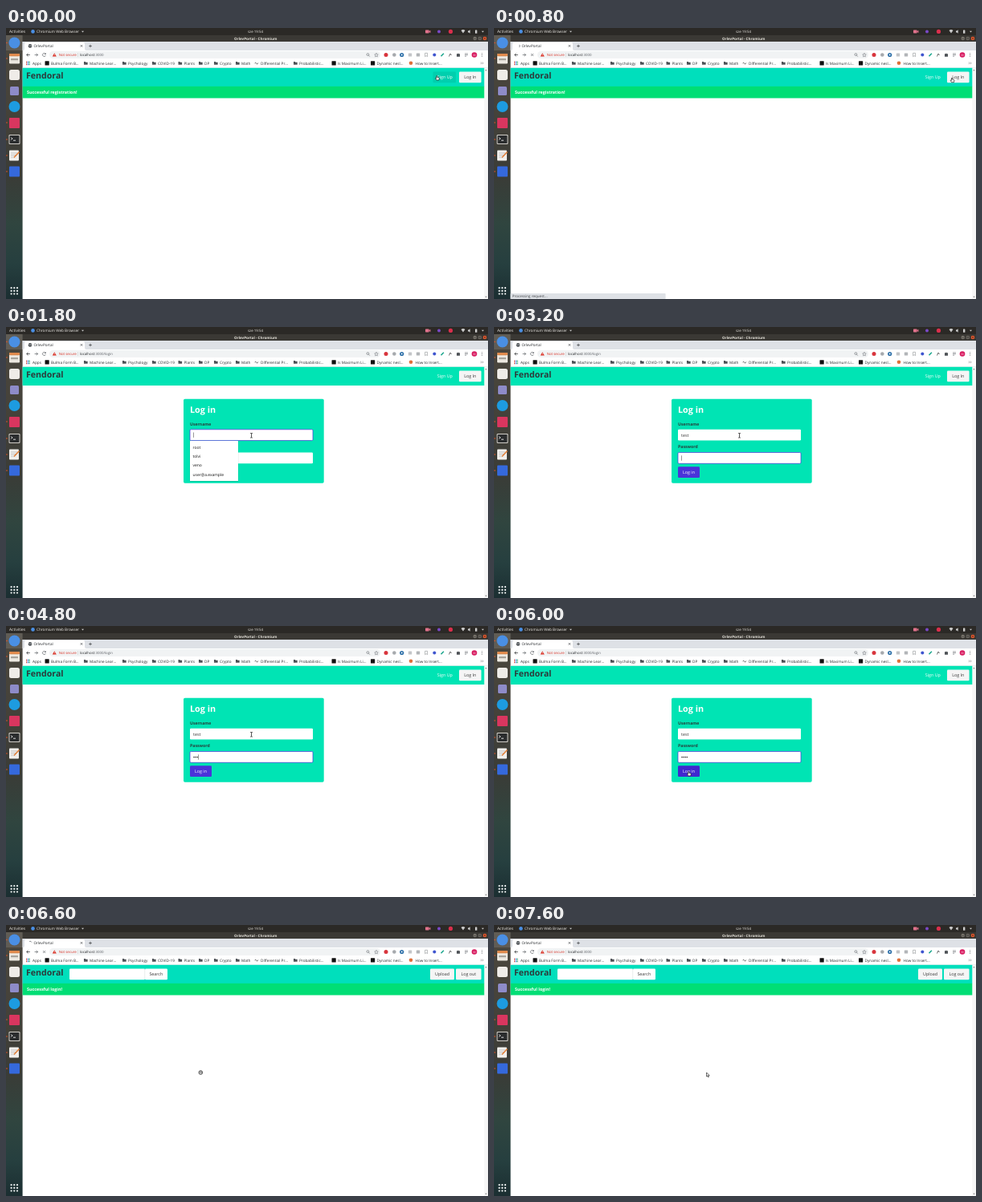
An HTML page that plays this animation: 600x338 px, repeating every 8 s.

```html
<!DOCTYPE html>
<html lang="en">
<head>
<meta charset="utf-8">
<title>Login demo</title>
<style>
  html, body { margin: 0; width: 100%; height: 100%; overflow: hidden; background: #fff; }
  svg { display: block; width: 100vw; height: 100vh; }
  text { font-family: "Open Sans", "Noto Sans", sans-serif; text-rendering: geometricPrecision; white-space: pre; }
</style>
</head>
<body>
<svg id="stage" viewBox="0 0 600 338" preserveAspectRatio="none">
  <defs>
    <linearGradient id="wall" x2="0" y2="1">
      <stop offset="0" stop-color="#4c483f"/>
      <stop offset=".3" stop-color="#45423a"/>
      <stop offset=".55" stop-color="#3a3c37"/>
      <stop offset=".72" stop-color="#30453f"/>
      <stop offset=".87" stop-color="#263f3f"/>
      <stop offset="1" stop-color="#1b2e31"/>
    </linearGradient>
    <symbol id="folder" viewBox="0 0 5 5" width="5" height="5">
      <path d="M0 .9h1.9l.6.6H5v3H0z" fill="#4d5156"/>
    </symbol>
    <symbol id="hand" overflow="visible">
      <path d="M-.5 0q.5-.4.9 0l.2 1.6 1.9.5q.6.2.4 1.1l-.4 2H-.4l-1.3-1.9q-.2-.7.4-.7l.7.4z" fill="#fff" stroke="#111" stroke-width=".65"/>
    </symbol>
    <symbol id="arrow" overflow="visible">
      <path d="M0 0v5l1.1-1 .8 1.8.9-.4-.8-1.7h1.6z" fill="#fff" stroke="#111" stroke-width=".65"/>
    </symbol>
    <symbol id="beam" overflow="visible">
      <path d="M-1.4-2.8h1q.4 0 .4.4.1-.4.4-.4h1M0-2.4v4.8M-1.4 2.8h1q.4 0 .4-.4.1.4.4.4h1" fill="none" stroke="#111" stroke-width=".7"/>
    </symbol>
    <symbol id="busy" overflow="visible">
      <circle r="2.4" fill="#ccc" stroke="#444" stroke-width=".8"/>
      <path d="M-1 .4A1.1 1.1 0 1 1 .5 1" fill="none" stroke="#555" stroke-width=".7"/>
    </symbol>
  </defs>
  <g id="desk"></g>
  <g id="chrome"></g>
  <g id="home"></g>
  <g id="login"></g>
  <g id="member"></g>
  <g id="status"></g>
  <use id="cursor"/>
</svg>
<script>
const NS = 'http://www.w3.org/2000/svg';
const $ = id => document.getElementById(id);
let layer;

function add(tag, attrs, parent = layer) {
  const el = document.createElementNS(NS, tag);
  for (const k in attrs) el.setAttribute(k, attrs[k]);
  return parent.appendChild(el);
}
const rect = (x, y, width, height, fill, rx = 0, more) => add('rect', { x, y, width, height, fill, rx, ...more });
const disc = (cx, cy, r, fill, more) => add('circle', { cx, cy, r, fill, ...more });
const line = (d, stroke, w = .7, more) => add('path', { d, stroke, 'stroke-width': w, fill: 'none', ...more });
const shape = (d, fill) => add('path', { d, fill });
function text(x, y, str, size, fill = '#333', weight = 400, more) {
  const el = add('text', { x, y, 'font-size': size, fill, 'font-weight': weight, ...more });
  el.textContent = str;
  return el;
}
const group = id => add('g', { id });

const APP = 'OrlevPortal', BRAND = 'Fendoral';
const TEAL = '#00e4b4', SOFT_TEAL = '#00dfbc', GREEN = '#00de75', VIOLET = '#4a33d9';
const GREY = '#5f6368', INK = '#24272a', PANEL_INK = '#f0eeea';

function drawDesk() {
  layer = $('desk');
  rect(0, 0, 21, 338, 'url(#wall)');
  rect(0, 9, 21, 19, '#77736c', 0, { opacity: .5 });
  rect(0, 0, 600, 9, '#2b2926');
  rect(20.6, 9, 580, 8, '#3a3834');
  text(4, 6.1, 'Activities', 4.9, PANEL_INK);
  disc(33.5, 4.4, 2.3, '#4a8fe4');
  text(38, 6.1, 'Chromium Web Browser', 4.65, PANEL_INK);
  shape('M94 3.8h3l-1.5 1.8z', '#ccc');
  text(301, 6.1, 'sze 19:54', 4.4, PANEL_INK);
  rect(522, 2.4, 4.6, 4, '#e0728c', .6);
  shape('M526.6 4l1.8-1.2v3.4l-1.8-1.2z', '#e0728c');
  disc(539, 4.4, 2, '#7a49c9');
  disc(553.5, 4.4, 2.6, '#d92f4c');
  shape('M566.5 3q2.5-2 5 0L569 6.6z', '#ccc');
  shape('M575 3.6h1.2l1.5-1.3v4.4l-1.5-1.3H575z', '#ccc');
  rect(584, 2.5, 2.4, 4.3, '#ccc', .4);
  shape('M592 3.8h3l-1.5 1.8z', '#ccc');
  text(284, 14.6, APP + ' - Chromium', 4.5, '#e6e3db', 700);
  disc(583.7, 13, 2.2, '#76726a');
  disc(589.8, 13, 2.2, '#76726a');
  disc(596, 13, 2.3, '#e2562b');
  line('M582.7 13.4h2M588.9 12.1h1.8v1.8h-1.8zM595.2 12.2l1.6 1.6M596.8 12.2l-1.6 1.6', '#222', .5);

  disc(10.5, 18.5, 7, '#4a8fe4');
  rect(4, 32, 13, 12.5, '#ece8e0', 1.2);
  rect(4, 32, 13, 3.2, '#e08a4c', 1);
  rect(6, 38, 9, 2.2, '#a8a49c', .5);
  rect(4, 52, 13, 13, '#efece8', 2.5);
  rect(5, 73, 11, 11, '#8e8bc8', 1.5);
  disc(10.5, 98, 7, '#1d9be0');
  rect(4, 112, 13, 13, '#d9365f', 1);
  rect(3.5, 133, 14, 12, '#cfccc6', 1.2);
  rect(4.5, 134, 12, 10, '#2b2d2e', .8);
  line('M6.3 136.6l1.8 1.4-1.8 1.4M9 140.2h3', '#fff', .8);
  rect(4, 152.5, 12, 13, '#f1efec', 1);
  line('M6 156h8M6 158.5h7M6 161h5', '#aaa', .6);
  line('M10 161.5l6.5-7', '#e1803a', 1.6);
  rect(4, 172.5, 13, 13, '#3569dc', 1);
  for (const y of [18.5, 38, 118, 139, 159, 179]) disc(1, y, .8, '#e2562b');
  for (let i = 0; i < 9; i++) disc(6.6 + i % 3 * 3.7, 324.2 + Math.floor(i / 3) * 3.7, 1.15, '#e8ecec');
}

function drawBookmarks() {
  for (let i = 0; i < 9; i++)
    rect(25 + i % 3 * 1.7, 41.6 + Math.floor(i / 3) * 1.7, 1.2, 1.2, ['#db4437', '#4285f4', '#0f9d58'][i % 3]);
  const marks = [
    [33, 'Apps'], [56, 'Bulma Form B...', 'b'], [104, 'Machine Lear...', 'f'], [152, 'Psychology', 'f'],
    [189, 'COVID-19', 'f'], [221.5, 'Plants', 'f'], [247, 'DP', 'f'], [266, 'Crypto', 'f'], [293, 'Math', 'f'],
    [317, 'Differential Pr...', 'c'], [365, 'Probabilistic...', 'f'], [413, 'Is Maximum Li...', 'b'],
    [461.5, 'Dynamic nesl...', 'b'], [509.5, 'How to Insert...', 'o']
  ];
  for (const [x, label, icon] of marks) {
    text(x, 45.7, label, 4.7, INK);
    if (icon === 'f') add('use', { href: '#folder', x: x - 7.2, y: 41.2 });
    if (icon === 'b') rect(x - 7.5, 41.2, 5.2, 5.2, '#111', .5);
    if (icon === 'c') line(`M${x - 7.4} 44.2q1-2 2 0t2-.6`, '#333', .8);
    if (icon === 'o') disc(x - 5.5, 43.8, 2.3, '#e0703a');
  }
  line('M590.8 42.6l1.4 1.2-1.4 1.2M592.8 42.6l1.4 1.2-1.4 1.2', GREY, .5);
}

function drawChrome() {
  layer = $('chrome');
  rect(20.6, 17, 580, 321, '#fff');
  rect(20.6, 17, 580, 11, '#dee1e6');
  shape('M21 28q2 0 2-2v-6.2q0-1.8 2-1.8h71q2 0 2 1.8V26q0 2 2 2z', '#fff');
  text(34.5, 24, APP, 4.6, INK);
  line('M92.8 21.2l2.4 2.4M95.2 21.2l-2.4 2.4M105 20.7v3.6M103.2 22.5h3.6', INK, .6);

  const idle = group('idle'), loading = group('loading');
  layer = idle;
  disc(30, 22.4, 2.3, '#45494d');
  line('M28.2 21.5q1.5.2 1.5 1.6M31.2 20.9l-.6 1.3 1.3.8', '#dfe2e5', .6);
  line('M49.1 32.3a2 2 0 1 0 .3 1.8', GREY, .7);
  shape('M49.7 31v2.1h-2.1z', GREY);
  layer = loading;
  add('path', { id: 'spinner', d: 'M0-2.1A2.1 2.1 0 0 1 2.1 0', stroke: GREY, 'stroke-width': .7, fill: 'none' });
  line('M46 32l3 3M49 32l-3 3', GREY, .7);

  layer = $('chrome');
  line('M29.8 33.5h-4M27.6 31.6l-1.9 1.9 1.9 1.9', INK);
  line('M35.6 33.5h4M37.7 31.6l1.9 1.9-1.9 1.9', GREY);
  rect(54, 29, 412, 9, '#f1f3f4', 4.5);
  shape('M60.3 31.2l2.5 4.4h-5z', '#d93025');
  rect(60, 32.6, .6, 1.6, '#fff');
  text(65.7, 35.1, 'Not secure', 4.37, '#d93025');
  rect(89.6, 31, .4, 5, '#bbb');
  const url = text(92, 35.1, 'localhost', 4.37, INK);
  add('tspan', { id: 'path', fill: GREY }, url);
  disc(450.4, 33.1, 1.4, 'none', { stroke: GREY, 'stroke-width': .6 });
  line('M451.4 34.2l1.4 1.4', GREY);
  line('M461 31.3l.7 1.5 1.6.2-1.2 1.1.3 1.7-1.4-.8-1.4.8.3-1.7-1.2-1.1 1.6-.2z', GREY, .5);
  disc(473, 33.5, 2.5, '#d8343c');
  disc(483.3, 33.5, 2.3, '#a6a9ad');
  disc(492.7, 33.5, 2.6, '#2d6fa8');
  disc(492.7, 33.5, .9, '#fff');
  rect(500.8, 31.4, 4.4, 4.2, '#c3c5c8', .6);
  rect(510.8, 31.4, 4.4, 4.2, '#b2b5b8', .6);
  line('M521.6 31.3h3v4.4l-1.5-1.1-1.5 1.1z', '#8a8d91', .6);
  disc(533.3, 33.5, 2, '#3f55cf');
  line('M541.5 35.3l3.4-3.6', '#18a58b', 1.5);
  line('M551.5 35.5l1.5-3.5 1.6 2', '#444', .8);
  shape('M561 32.3h1.4q.5-1.6 1.2 0H565v3.5h-4z', '#4d5156');
  line('M571 32h4M571 33.6h4M571 35.2h2.2', GREY, .6);
  disc(583, 33.5, 3.3, '#d81b60');
  text(583, 34.8, 'M', 3.4, '#fff', 400, { 'text-anchor': 'middle' });
  for (const y of [31.7, 33.5, 35.3]) disc(592.6, y, .5, GREY);
  drawBookmarks();
  rect(20.6, 49.2, 580, .5, '#dadce0');
  rect(595.3, 49.7, 5, 289, '#f6f6f6');
  shape('M596.3 53.2h2.4l-1.2-1.5z', '#777');
  shape('M596.3 334.8h2.4l-1.2 1.5z', '#777');
}

function navBar(fill) {
  rect(20.6, 49.8, 574.7, 23.2, fill);
  text(25, 62.5, BRAND, 10.6, '#2c3b3b', 700);
}
function button(x, w, label) {
  rect(x, 54.4, w, 13.8, '#f5f5f5', 1.3);
  text(x + w / 2, 63.2, label, 5.35, '#363636', 400, { 'text-anchor': 'middle' });
}
function notice(msg) {
  rect(20.6, 72.8, 574.7, 14.7, GREEN);
  text(26, 82.1, msg, 5.4, '#fff', 700);
}

function drawHome() {
  layer = $('home');
  navBar(SOFT_TEAL);
  rect(531.5, 54.4, 28.5, 13.8, '#00cfae', 1.3, { id: 'hover' });
  text(536.8, 63.2, 'Sign Up', 5.35, '#fff');
  button(564, 27.6, 'Log In');
  notice('Successful registration!');
}

function field(y, id) {
  rect(229, y, 153, 13.8, '#fff', 1.3);
  rect(229, y, 153, 13.8, 'none', 1.3, { id: id + 'Ring', stroke: VIOLET, 'stroke-width': .7 });
}

function drawLogin() {
  layer = $('login');
  navBar(TEAL);
  text(536.8, 63.2, 'Sign Up', 5.35, '#fff');
  button(564, 27.6, 'Log In');
  rect(221, 89.7, 174.7, 105, TEAL, 1.7);
  text(229, 106.6, 'Log in', 10.8, '#fff', 700);
  text(229, 122.7, 'Username', 5.15, '#26403c', 700);
  field(127.8, 'user');
  text(233, 136.7, '', 5.35, '#363636').id = 'userText';
  text(229, 151.4, 'Password', 5.2, '#26403c', 700);
  field(156.5, 'pass');
  layer = group('dots');
  for (let i = 0; i < 4; i++) disc(234 + i * 2.1, 163.6, .8, '#363636');
  layer = $('login');
  rect(229, 174.3, 27, 13.8, VIOLET, 1.3, { id: 'submit' });
  text(242.5, 183.1, 'Log in', 5.35, '#fff', 400, { 'text-anchor': 'middle' });
  rect(0, 0, .5, 6.4, '#333', 0, { id: 'caret' });

  layer = group('menu');
  rect(228.7, 142, 60.6, 50.7, '#000', .6, { opacity: .18 });
  rect(229, 142, 60, 50, '#fff', .6);
  ['root', 'tolvi', 'veno', 'user@a.example'].forEach((name, i) =>
    text(232.6, 152 + i * 11.2, name, 4.95, '#111', 500));
}

function drawMember() {
  layer = $('member');
  navBar(SOFT_TEAL);
  rect(79, 54.4, 94, 13.8, '#fff', 1.3);
  rect(173, 54.4, 28, 13.8, '#fff', 1.3);
  rect(172.7, 54.6, .4, 13.4, '#c8d4d2');
  text(178.4, 63.2, 'Search', 5.35, '#363636');
  button(528, 30, 'Upload');
  button(560, 31.6, 'Log out');
  notice('Successful login!');
}

function drawStatus() {
  layer = $('status');
  rect(20.6, 331, 193, 7, '#dee1e6', .8);
  text(22.7, 336.4, 'Processing request...', 4.57, '#3f4246');
}

drawDesk(); drawChrome(); drawHome(); drawLogin(); drawMember(); drawStatus();

// Each step overrides only what changes at its time (ms).
const USER_Y = 131.5, PASS_Y = 160.3;
const steps = [
  [0, { page: 'home', cursor: ['hand', 536.4, 59.8], hover: true, loading: false, status: false,
        focus: '', user: '', dots: 0, caret: null, menu: false, press: false }],
  [200, { cursor: ['hand', 560, 61], hover: false }],
  [400, { cursor: ['hand', 573, 61] }],
  [600, { loading: true, status: true }],
  [800, { cursor: ['hand', 570, 62.5] }],
  [1000, { page: 'login', loading: false, cursor: ['hand', 548.3, 73.7] }],
  [1200, { cursor: ['beam', 345, 132] }],
  [1400, { cursor: ['beam', 305.5, 135.3], status: false }],
  [1600, { focus: 'user', caret: [233, USER_Y] }],
  [1800, { menu: true }],
  [2400, { user: 't', menu: false, caret: [235, USER_Y] }],
  [2600, { user: 'te', caret: [238, USER_Y] }],
  [2800, { user: 'tes', caret: [240.6, USER_Y] }],
  [3000, { user: 'test', caret: [242.6, USER_Y] }],
  [3200, { focus: 'pass', caret: [233, PASS_Y] }],
  [3800, { caret: null }],
  [4200, { dots: 1, caret: [235.4, PASS_Y] }],
  [4400, { dots: 2, caret: [237.4, PASS_Y] }],
  [4800, { dots: 3, caret: [239.5, PASS_Y] }],
  [5000, { dots: 4, caret: [241.5, PASS_Y] }],
  [5600, { cursor: ['arrow', 290, 147], caret: null }],
  [5800, { cursor: ['arrow', 256, 172] }],
  [6000, { cursor: ['hand', 242.3, 181.7], press: true }],
  [6200, { loading: true }],
  [6600, { page: 'member', cursor: ['busy', 242.3, 184] }],
  [6800, { loading: false }],
  [7600, { cursor: ['arrow', 264.6, 184] }]
];
const LOOP = 8000;

const show = (id, on) => $(id).setAttribute('display', on ? 'inline' : 'none');

function render(t) {
  const s = Object.assign({}, ...steps.filter(([at]) => at <= t).map(step => step[1]));
  for (const page of ['home', 'login', 'member']) show(page, page === s.page);
  for (const id of ['hover', 'loading', 'status', 'menu']) show(id, s[id]);
  show('idle', !s.loading);
  const spin = Math.floor(t / 200) * 72 + 120;
  $('spinner').setAttribute('transform', `translate(30 22.4) rotate(${spin})`);
  $('path').textContent = ':3000' + (s.page === 'login' ? '/login' : '');
  for (const id of ['user', 'pass']) show(id + 'Ring', s.focus === id);
  $('userText').textContent = s.user;
  [...$('dots').children].forEach((dot, i) => dot.setAttribute('opacity', i < s.dots ? 1 : 0));
  $('submit').setAttribute('fill', s.press ? '#4028cf' : VIOLET);
  show('caret', s.caret);
  if (s.caret) {
    $('caret').setAttribute('x', s.caret[0]);
    $('caret').setAttribute('y', s.caret[1]);
  }
  const [kind, x, y] = s.cursor;
  $('cursor').setAttribute('href', '#' + kind);
  $('cursor').setAttribute('transform', `translate(${x} ${y})`);
}

const start = performance.now();
function tick() {
  render((performance.now() - start) % LOOP);
  requestAnimationFrame(tick);
}
tick();
</script>
</body>
</html>
```
